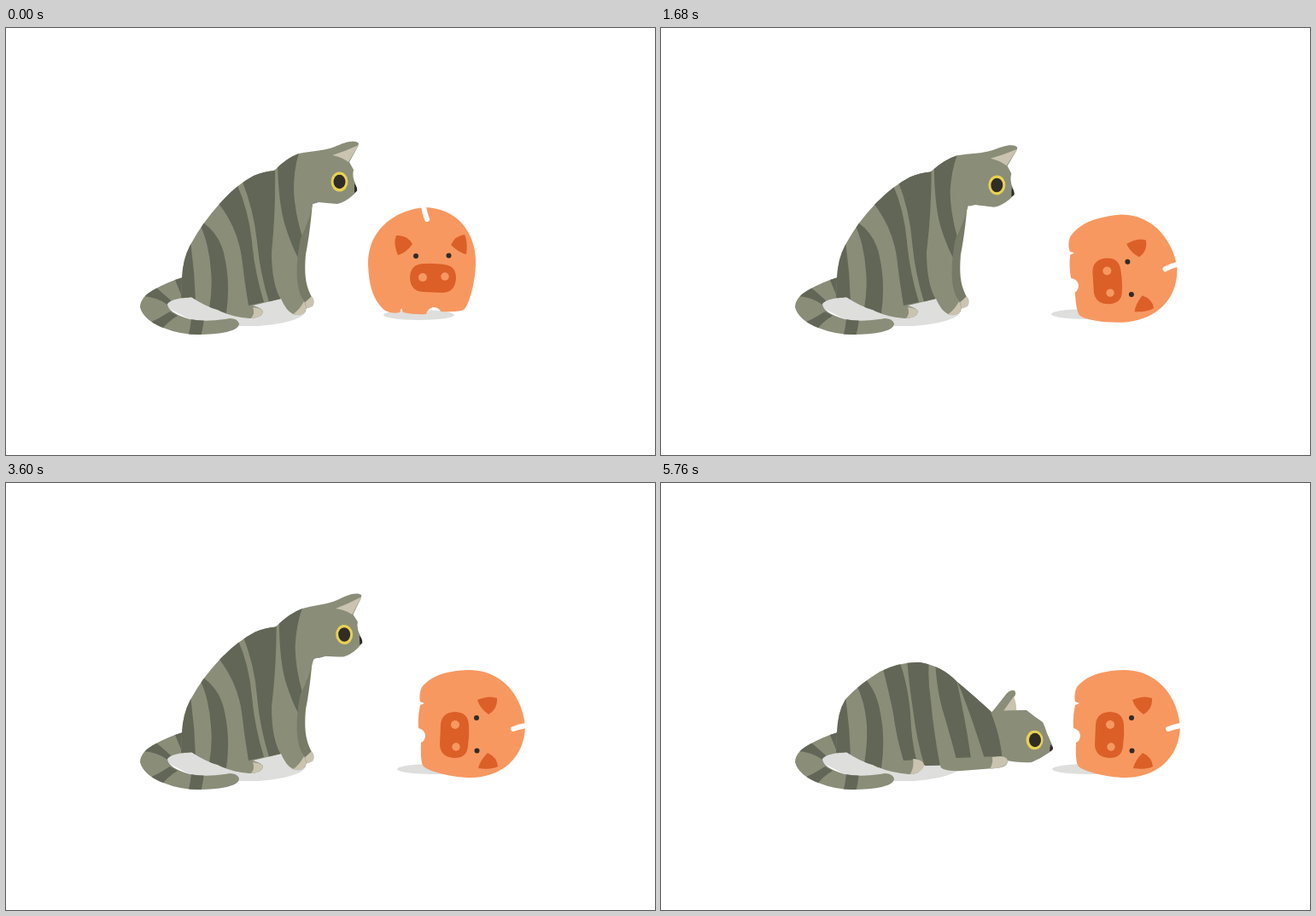
Recreate the animation shown at these times as an HTML page. Size 760x500 px, loop 5840 ms.

```html
<!DOCTYPE html>
<html lang="en">
<head>
<meta charset="utf-8">
<title>Cat and piggy bank</title>
<style>
html, body { margin: 0; width: 100%; height: 100%; overflow: hidden; background: #fff; }
svg { display: block; width: 100vw; height: 100vh; }
.light { fill: #8a8d78; }
.dark { fill: #626657; }
.far { fill: #767a66; }
.pale { fill: #c9c3b0; }
.shade { fill: #dededd; }
.ink { fill: #302c26; }
.yellow { fill: #e7d153; }
.lid { fill: none; stroke: #3a372e; stroke-width: 4; stroke-linecap: round; }
.orange { fill: #f79861; }
.rust { fill: #dc5f28; }
.slot { fill: none; stroke: #fff; stroke-width: 6; stroke-linecap: round; }
</style>
</head>
<body>
<svg viewBox="0 0 760 500">
  <defs>
    <clipPath id="sitClip"><path id="sitClipPath"/></clipPath>
    <clipPath id="lieClip"><path id="lieClipPath"/></clipPath>
    <clipPath id="tailClip"><path id="tailClipPath"/></clipPath>
  </defs>

  <path class="shade" d="M188,327 C188,314 208,316 222,315 L322,317 L350,333 C348,341 322,347 296,349 L230,349 Z"/>
  <ellipse id="pigShade" class="shade" cx="483.500" cy="336" rx="41.500" ry="6"/>

  <path id="tail" class="light"/>
  <g clip-path="url(#tailClip)" class="dark">
    <path d="M196,290 L222,290 L224,320 L207,317 Z"/>
    <path d="M160,314 L176,304 L193,319 L189,324 Q177,315 160,314 Z"/>
    <path d="M166,346 Q180,340 192,332 L201,337 Q190,343 181,355 Z"/>
    <path d="M213,362 Q216,352 217,340 L232,340 Q231,350 228,362 Z"/>
  </g>

  <g id="sit">
    <g id="farLeg">
      <path class="far" d="M359,204 Q356,240 351,265 C349,290 351,302 358,315 L347,327 L336,300 L340,247 Z"/>
      <path class="pale" d="M358,314 Q363,320 359,326 Q355,328 350,329 L346,325 Z"/>
    </g>
    <g id="arm"><path class="far"/><path class="pale"/></g>
    <path id="sitBody" class="light"/>
    <g id="sitStripes" class="dark" clip-path="url(#sitClip)"></g>
    <path class="pale" d="M336,335 Q343,331 349,320 Q353,327 350,333 Q344,338 336,335 Z"/>
    <path class="pale" d="M289,327 Q301,328 301,333 Q299,339 287,340 Q292,334 289,327 Z"/>
    <path id="neck" class="light"/>
    <g id="head">
      <path class="light" d="M343,147 C357,144 372,144 385,139 C396,134 408,130 413,135 L412,139 L402,157 L407,166 Q405,174 409,182 L411,189 Q410,193 406,196 Q397,204 388,206 Q375,205 366,204 L359,206 L350,178 Z"/>
      <path class="pale" d="M382,149 Q398,144 413,137 L401,157 Q393,151 382,149 Z"/>
      <path class="ink" d="M408,182 Q412,187 411,191 L408,193 Z"/>
      <g class="open">
        <ellipse class="yellow" cx="390.500" cy="180" rx="10" ry="11.500"/>
        <ellipse class="ink" cx="390.500" cy="180" rx="7" ry="8.300"/>
      </g>
      <path class="lid" d="M375,186 Q383,191 393,191"/>
    </g>
  </g>

  <g id="lie">
    <path id="lieBody" class="light"/>
    <g id="lieStripes" class="dark" clip-path="url(#lieClip)"></g>
    <path class="pale" d="M295,323 Q308,324 308,331 Q304,341 292,341 Q297,331 295,323 Z"/>
    <g id="earUp">
      <path class="light" d="M387,269 L402,250 Q408,241 414,243 Q417,247 413,251 L403,268 Z"/>
      <path class="pale" d="M401,267 L413,250 Q417,259 416,268 Z"/>
    </g>
    <g id="earBack">
      <path class="light" d="M399,269 L391,251 Q392,247 397,248 L410,262 L408,269 Z"/>
      <path class="pale" d="M397,248 Q412,255 426,267 L406,268 Z"/>
    </g>
    <path class="light" d="M386,268 Q398,266 428,266 Q438,274 447,280 Q450,286 452,293 L459,309 Q459,313 454,316 Q444,323 434,327 Q420,328 400,324 Q397,294 386,268 Z"/>
    <path class="ink" d="M456,306 L459,310 Q459,314 455,314 Z"/>
    <g class="open">
      <ellipse class="yellow" cx="437.500" cy="301" rx="10" ry="11.300"/>
      <ellipse class="ink" cx="438" cy="301" rx="7" ry="8.300"/>
    </g>
    <path class="lid" style="stroke-width:5" d="M429,295 Q436,300 445,304"/>
    <path class="light" d="M327,331 Q330,323 345,322 L396,320 Q407,320 406,327 Q404,334 390,334 L352,337 Q328,338 327,331 Z"/>
    <path class="pale" d="M388,321 L398,320 Q407,321 406,327 Q404,333 385,335 Q389,328 388,321 Z"/>
  </g>

  <g id="pig">
    <path class="orange" d="M424,277 C423,241 450,214 490,210 C529,211 550,240 550,274 C550,296 543,322 537,329 Q533,333 509,332 Q507,327 500,327 Q494,328 492,335 Q478,336 465,333 L463,328 L461,333 Q452,335 444,331 C430,319 425,302 424,277 Z"/>
    <path class="slot" d="M489,209 Q490,216 493,224"/>
    <path class="rust" d="M457,243 Q470,242 476,253 Q469,263 459,266 Q453,252 457,243 Z M537,242 Q526,243 521,254 Q530,263 539,265 Q541,250 537,242 Z"/>
    <path class="rust" d="M488,276 Q500,275 513,277 Q527,278 527,293 Q526,309 512,310 L488,309 Q474,308 473,293 Q473,277 488,276 Z"/>
    <circle class="orange" cx="488" cy="292" r="5"/>
    <circle class="orange" cx="514" cy="291" r="4.700"/>
    <circle class="ink" cx="480" cy="267" r="3"/>
    <circle class="ink" cx="518.500" cy="266.500" r="3"/>
  </g>
</svg>

<script>
const LOOP = 5840, STEP = 80;
const $ = id => document.getElementById(id);

const tail = 'M207,292 Q190,297 174,306 Q157,315 157,327 Q161,342 184,351 Q204,359 225,359 Q273,358 273,346 Q271,340 262,340 Q235,345 215,341 Q189,333 189,323 Q194,316 222,315 L218,290 Z';

const sitBody = 'M206,293 Q207,269 217,252 Q230,228 250,206 Q269,184 290,173 Q302,168 314,167 Q330,151 343,147 L362,160 L365,200 L359,206 Q354,228 345,247 C340,272 338,298 346,315 L350,321 Q353,329 350,333 Q344,338 336,335 Q328,331 322,317 L289,325 Q301,328 301,333 Q299,340 285,340 Q262,338 248,330 Q233,326 217,315 L205,316 Z';
const sitStripes = [
  'M196,300 L203,270 L216,250 Q221,285 222,320 L200,320 Z',
  'M226,228 Q238,252 240,285 Q242,305 238,328 L258,334 Q263,300 256,268 Q251,242 231,228 Z',
  'M246,202 Q270,230 276,268 Q279,296 284,325 L302,321 Q291,285 288,250 Q284,213 270,182 Z',
  'M276,178 Q290,212 294,250 Q297,285 308,321 L322,318 Q311,300 311,262 Q316,215 315,162 Z',
  'M318,160 Q319,205 327,232 Q334,254 342,269 L347,245 Q338,215 337,190 Q337,166 343,146 Z'
];

const lieBody = 'M206,293 Q207,266 217,252 Q232,236 256,221 Q280,209 303,210 Q329,214 347,233 Q364,247 388,269 L402,300 L400,325 L345,330 L310,331 L296,324 Q308,325 308,331 Q304,341 290,341 Q265,339 248,330 Q233,326 217,315 L205,316 Z';
const lieStripes = [
  sitStripes[0],
  'M227,233 Q239,254 241,285 Q242,305 238,328 L258,334 Q263,300 257,270 Q253,244 238,228 Z',
  'M259,214 Q267,245 272,270 Q276,300 284,325 L299,324 Q293,300 292,270 Q289,235 279,208 Z',
  'M288,206 Q291,240 295,265 Q299,300 309,333 L327,332 Q319,290 316,255 Q312,230 314,206 Z',
  'M321,208 Q323,245 331,270 Q340,300 346,324 L363,323 Q358,285 346,230 Z',
  'M346,230 Q362,268 379,323 L400,323 Q398,295 386,266 Z'
];

// Limb and paw of the raised foreleg.
const arms = {
  raised: ['M345,247 C385,246 417,225 418,182 L417,172 L404,176 L396,195 L358,204 Z',
    'M404,176 L417,172 Q415,159 408,159 L403,164 Z'],
  reach: ['M345,247 C365,264 388,262 400,240 L389,231 C380,240 366,234 358,204 Z',
    'M389,231 L400,240 Q408,231 402,225 Q394,223 389,231 Z'],
  strike: ['M345,247 C370,264 405,262 428,252 L424,238 C400,244 375,235 358,204 Z',
    'M428,252 L424,238 Q438,233 441,241 Q441,250 428,252 Z']
};

// Upper body: time, head shift x and y, head angle, lean of the back.
const posture = [
  [640, 0, 0, 0, 0], [800, -4, -4, -7, 0], [960, 14, 14, 23, 0], [1040, 14, 14, 23, 0], [1200, 0, 0, 0, 0],
  [1360, 0, 0, 0, 0], [1440, 8, 5, 4, .4], [1520, 12, 7, 6, .6], [1760, 0, 0, 0, 0],
  [2320, 0, 0, 0, 0], [2480, 3, 1, 0, .15], [2800, 19, 6, 0, .9], [2960, 21, 7, 0, 1],
  [3520, 21, 7, 0, 1], [3600, 4, 0, -3, .2], [3680, -8, -17, -18, 0]
];
// Pig: time, angle.
const tip = [[1360, 0], [1440, 6], [1520, 28], [1600, 60], [1680, 84], [1760, 95], [1920, 87], [2080, 91], [2160, 90]];
const armTimes = [[0, null], [1280, 'reach'], [1360, 'raised'], [1440, 'strike'], [1600, 'reach'], [1680, null]];
const blinks = [[160, 320], [880, 1120], [2560, 2720], [3200, 3280], [3680, 4000], [4320, 4480], [5280, 5360], [5600, 5760]];
const earsBack = [[3760, 3920], [4800, 4960]];
const LIE_START = 3760, LEAN_SHIFT = 8;

const within = (spans, t) => spans.some(([a, b]) => t >= a && t < b);
const held = (track, t) => track.filter(([at]) => at <= t).pop()[1];
const clamp = v => Math.max(0, Math.min(1, v));

function tween(track, t) {
  const next = track.findIndex(([at]) => at > t);
  if (next <= 0) return (next ? track[track.length - 1] : track[0]).slice(1);
  const a = track[next - 1], b = track[next], k = (t - a[0]) / (b[0] - a[0]);
  return a.slice(1).map((v, i) => v + (b[i + 1] - v) * k);
}

// The nape follows the head; the back leans as a whole; haunch and feet stay.
function warp(path, dx, dy, lean) {
  const shift = lean * LEAN_SHIFT;
  return path.replace(/([\d.]+),([\d.]+)/g, (_, sx, sy) => {
    const x = +sx, y = +sy;
    const nape = clamp((x - 314) / 29) * clamp((190 - y) / 40);
    const back = shift * clamp((x - 230) / 40) * clamp((240 - y) / 50);
    const px = x + back + (dx - shift) * nape;
    const py = y + back + (dy - shift) * nape;
    return `${px.toFixed(1)},${py.toFixed(1)}`;
  });
}

function setPath(ids, d) { ids.forEach(id => $(id).setAttribute('d', d)); }

function show(el, on) { el.style.display = on ? '' : 'none'; }

function addPaths(id, list) {
  return list.map(d => {
    const path = document.createElementNS('http://www.w3.org/2000/svg', 'path');
    path.setAttribute('d', d);
    return $(id).appendChild(path);
  });
}

setPath(['tail', 'tailClipPath'], tail);
setPath(['lieBody', 'lieClipPath'], lieBody);
addPaths('lieStripes', lieStripes);
const stripeEls = addPaths('sitStripes', sitStripes);
const openEyes = document.querySelectorAll('.open');
const lids = document.querySelectorAll('.lid');

function drawCat(t) {
  const lying = t >= LIE_START, closed = within(blinks, t);
  show($('sit'), !lying);
  show($('lie'), lying);
  openEyes.forEach(el => show(el, !closed));
  lids.forEach(el => show(el, closed));
  show($('earBack'), within(earsBack, t));
  show($('earUp'), !within(earsBack, t));
  if (lying) return;

  const [dx, dy, angle, lean] = tween(posture, t);
  setPath(['sitBody', 'sitClipPath'], warp(sitBody, dx, dy, lean));
  stripeEls.forEach((el, i) => el.setAttribute('d', warp(sitStripes[i], dx, dy, lean)));
  setPath(['neck'], `M360,170 L${380 + dx},${200 + dy} L${366 + dx},${204 + dy} L359,${206 + dy} L354,228 Z`);
  $('head').setAttribute('transform', `translate(${dx} ${dy}) rotate(${angle} 343 147)`);

  const arm = arms[held(armTimes, t)];
  show($('arm'), arm);
  show($('farLeg'), !arm);
  if (arm) arm.forEach((d, i) => $('arm').children[i].setAttribute('d', d));
}

function drawPig(t) {
  const [angle] = tween(tip, t), k = Math.min(1, angle / 90);
  $('pig').setAttribute('transform', `translate(${58 * k} ${9 * k}) rotate(${angle} 487 273)`);
  $('pigShade').setAttribute('transform', `translate(${16 * k} ${-k})`);
}

let last = -1;
function frame() {
  const t = Math.floor(performance.now() % LOOP / STEP) * STEP;
  if (t !== last) {
    drawCat(t);
    drawPig(t);
    last = t;
  }
  requestAnimationFrame(frame);
}
frame();
</script>
</body>
</html>
```
